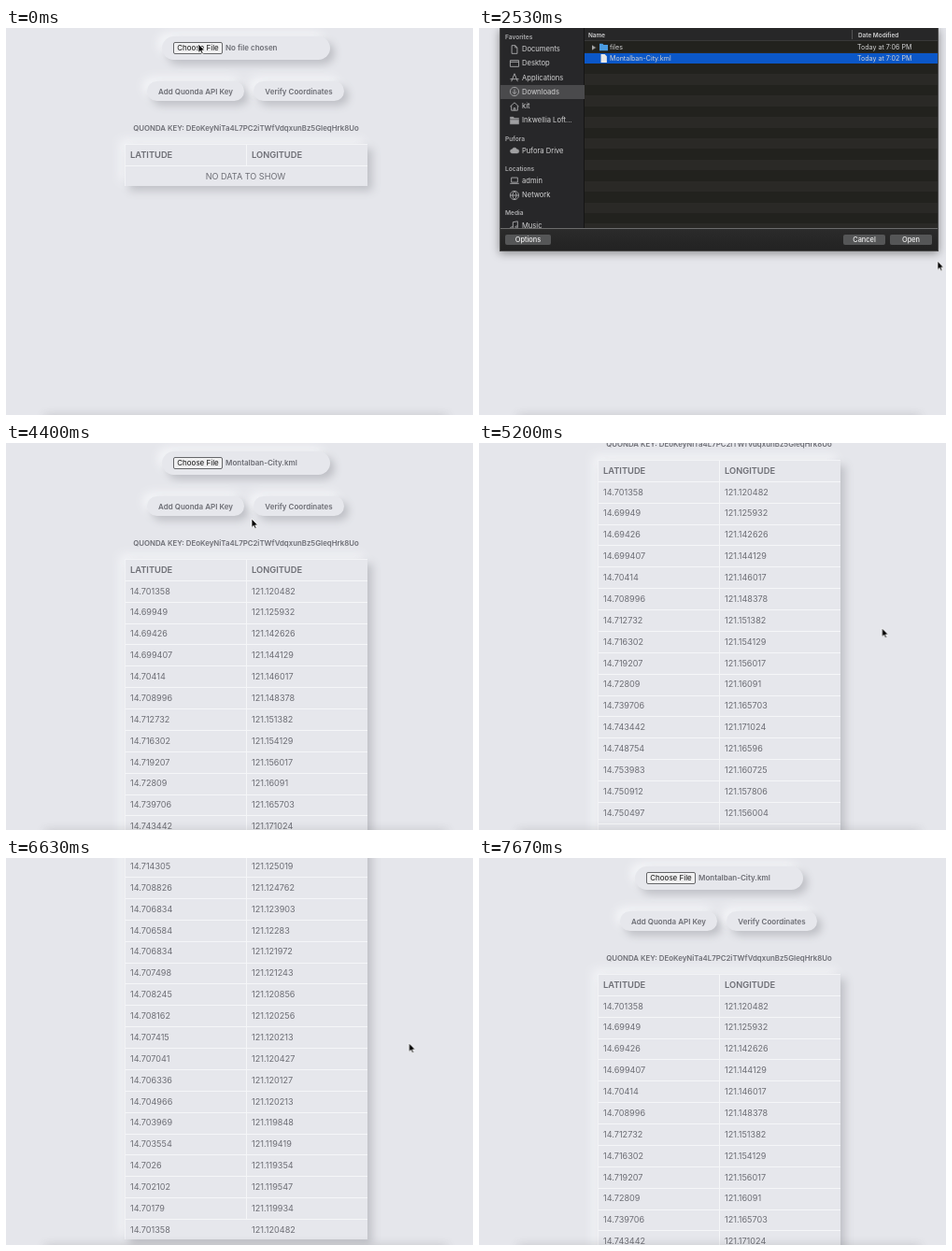
These frames come from a looping animation (500x414 px, 8110 ms). An HTML page:

```html
<!DOCTYPE html>
<html lang="en">
<head>
<meta charset="utf-8">
<title>Coordinate table</title>
<style>
  html, body { margin: 0; width: 100%; height: 100%; overflow: hidden; background: #e5e6eb; }
  #stage { position: absolute; left: 0; top: 0; width: 500px; height: 414px; overflow: hidden;
    background: #e5e6eb; font-family: Inter, "Liberation Sans", sans-serif; color: #6d6e75; }
  #stage div, #stage svg { position: absolute; box-sizing: border-box; }
  .text { white-space: pre; height: 20px; line-height: 20px; }
  .mid { transform: translateX(-50%); }
  .soft { background: #e6e7ec; box-shadow: 5px 5px 9px #bfc0c6, -5px -5px 10px #f3f4f7; }
  .pill { border-radius: 13px; }
  .bold { font-weight: 600; font-size: 8px; }
  .head { font-weight: 600; font-size: 9.3px; }
  .cell { font-size: 9.1px; }
  .line { background: #f5f6f8; }
  .picker { background: #232323; border: 1px solid #484848; border-top: 0;
    box-shadow: 0 2px 9px rgba(0, 0, 0, .4); color: #d2d2d3; }
  .group { font-weight: 600; font-size: 6.6px; color: #adadaf; }
  .item { font-size: 7.6px; }
  .file { font-size: 7.1px; }
  .key { border-radius: 2px; background: #555657; font-size: 7.4px; font-weight: 500;
    line-height: 11px; text-align: center; color: #efefef; }
</style>
</head>
<body>
<div id="stage"></div>
<script>
const LOOP = 8110;
const stage = document.getElementById('stage');

function box(parent, x, y, w, h, cls = '', style = '') {
  const el = document.createElement('div');
  el.className = cls;
  el.style.cssText = `left:${x}px;top:${y}px;width:${w}px;height:${h}px;${style}`;
  parent.append(el);
  return el;
}

// y is the optical centre of the line
function text(parent, x, y, value, cls = '', style = '') {
  const el = document.createElement('div');
  el.className = 'text ' + cls;
  el.style.cssText = `left:${x}px;top:${y - 9.3}px;${style}`;
  el.textContent = value;
  parent.append(el);
  return el;
}

function icon(parent, x, y, size, path, attrs) {
  const holder = box(parent, x, y, size, size);
  holder.innerHTML = `<svg width="${size}" height="${size}" viewBox="0 0 12 12" ` +
    `style="overflow:visible"><path d="${path}" ${attrs}/></svg>`;
  return holder;
}

// steps: [time, value, easing towards the next step]
function play(el, prop, steps, ease = 'linear') {
  const all = [[0, steps[0][1], steps[0][0] ? 'steps(1,end)' : steps[0][2]],
    ...steps, [LOOP, steps[steps.length - 1][1]]];
  el.animate(all.map(([t, value, easing = ease]) =>
    ({ offset: t / LOOP, [prop]: value, easing })), { duration: LOOP, iterations: Infinity });
}

const during = (el, from, to) => play(el, 'opacity',
  [[0, from ? 0 : 1], ...(from ? [[from, 1]] : []), [to, 0]], 'steps(1,end)');

const SWAP = 3960, PICK = 1970;

// Web page
const page = box(stage, 0, 0, 500, 1210);
box(page, 167, 9, 180, 25, 'soft pill');
const choose = box(page, 179, 14.5, 53, 13, '',
  'border:1px solid #66676a;border-radius:2px;background:#f0f0f1');
text(page, 205.5, 20.7, 'Choose File', 'mid', 'font-size:8px;color:#111');
during(text(page, 235, 20.7, 'No file chosen', 'bold'), 0, SWAP);
during(text(page, 235, 20.7, 'Montalban-City.kml', 'bold'), SWAP, LOOP);
play(choose, 'backgroundColor',
  [[0, '#f0f0f1'], [430, '#d6d6d8'], [610, '#f0f0f1']], 'steps(1,end)');

box(page, 151, 57, 104, 21, 'soft pill');
box(page, 265, 57, 97, 21, 'soft pill');
text(page, 203, 67.3, 'Add Quonda API Key', 'bold mid');
text(page, 313.5, 67.3, 'Verify Coordinates', 'bold mid');
text(page, 257, 106.6, 'QUONDA KEY: DEoKeyNiTa4L7PC2iTWfVdqxunBz5GIeqHrk8Uo', 'bold mid',
  'font-size:7.85px');

// Fractions of 14 degrees north and 121 degrees east
const points = `701358 120482,69949 125932,69426 142626,699407 144129,70414 146017,
708996 148378,712732 151382,716302 154129,719207 156017,72809 16091,739706 165703,
743442 171024,748754 16596,753983 160725,750912 157806,750497 156004,746927 153386,
742361 149823,737546 145317,733312 14094,728995 136734,725093 1327,721776 129654,
721942 126993,720531 124933,719203 125019,717543 126049,715966 124332,714305 125019,
708826 124762,706834 123903,706584 12283,706834 121972,707498 121243,708245 120856,
708162 120256,707415 120213,707041 120427,706336 120127,704966 120213,703969 119848,
703554 119419,7026 119354,702102 119547,70179 119934,701358 120482`
  .split(',').map(p => p.trim().split(' '));
const ROW = 22.87, TOP = 123.6;

function table(rows) {
  const el = box(page, 127, TOP, 260, ROW * (rows + 1), 'soft',
    'border:solid #f2f3f6;border-width:1px 0 0 1px');
  box(el, 129, 0, 1, ROW * rows, 'line');
  text(el, 5, 10.4, 'LATITUDE', 'head');
  text(el, 135, 10.4, 'LONGITUDE', 'head');
  for (let i = 1; i <= rows; i++) box(el, 0, ROW * i - .6, 259, 1, 'line');
  return el;
}

const empty = table(1);
text(empty, 128.5, 33.3, 'NO DATA TO SHOW', 'cell mid');
during(empty, 0, SWAP);

const full = table(points.length);
points.forEach(([lat, lon], i) => {
  const y = 33.3 + ROW * i;
  text(full, 5, y, '14.' + lat, 'cell');
  text(full, 135, y, '121.' + lon, 'cell');
});
during(full, SWAP, LOOP);

const up = px => `translateY(${-px}px)`;
play(page, 'transform', [
  [0, up(0)], [4900, up(0), 'ease-in'], [5200, up(105), 'ease-out'], [5700, up(395)],
  [5730, up(395), 'cubic-bezier(.4,0,.7,.7)'], [6030, up(646), 'ease-out'], [6530, up(790)],
  [6720, up(790), 'ease-in-out'], [7430, up(4)], [7470, up(4), 'ease-out'], [7670, up(0)]
]);

box(stage, 42, 415, 430, 10, '', 'box-shadow:0 0 11px rgba(60,60,65,.22)');

// File picker
const picker = box(stage, 22, 0, 470, 239, 'picker');
const inner = box(picker, -23, 0, 500, 239);
box(inner, 23, 0, 90, 214, '', 'background:#272729;border-right:1px solid #151515');
box(inner, 23, 61, 90, 15, '', 'background:#4a4a4c');

const STROKE = 'fill="none" stroke="#a9a9ab" stroke-width="1.1"';
const SOLID = 'fill="#a0a0a2" stroke="#a0a0a2" stroke-width=".6"';
const sidebar = [
  [9, 'Favorites'],
  [22.3, 'Documents', 'M2.5 .8H7L9.5 3.5V11.2H2.5ZM7 .8V3.5H9.5'],
  [37.7, 'Desktop', 'M.5 2H11.5V10H.5ZM.5 4H11.5'],
  [53, 'Applications', 'M2 11L6 1 10 11M.5 8H11.5'],
  [68.2, 'Downloads', 'M6 .5A5.5 5.5 0 1 1 5.9 .5ZM6 3V9M3.5 6.5L6 9 8.5 6.5'],
  [83.4, 'kit', 'M.5 6L6 1 11.5 6M2 5V11H10V5M5 11V8H7V11'],
  [98.6, 'Inkwellia Loft...', 'M.5 1.5H4.5L6 3H11.5V4H.5ZM.5 5H11.5V10.5H.5Z', SOLID],
  [118, 'Pufora'],
  [131, 'Pufora Drive', 'M3 9.5A2.5 2.5 0 0 1 3 4.5 3.2 3.2 0 0 1 9 4.5 2.5 2.5 0 0 1 9.5 9.5Z', SOLID],
  [150, 'Locations'],
  [163, 'admin', 'M2 2.5H10V8.5H2ZM.3 10H11.7'],
  [178.4, 'Network', 'M6 .5A5.5 5.5 0 1 1 5.9 .5ZM.5 6H11.5M6 .5Q1 6 6 11.5Q11 6 6 .5'],
  [197.7, 'Media'],
  [210.8, 'Music', 'M4 9.5V2L10 1V8.5M4 9.5A1.5 1.2 0 1 1 3.9 9M10 8.5A1.5 1.2 0 1 1 9.9 8']
];
for (const [y, label, path, paint = STROKE] of sidebar) {
  text(inner, path ? 46 : 28, y, label, path ? 'item' : 'group');
  if (path) icon(inner, 33, y - 4.8, 10, path, paint);
}

const list = box(inner, 113, 0, 378, 214, '',
  'background:repeating-linear-gradient(#22221e 0 11.44px,#2a2926 11.44px 22.88px) 0 15px');
box(list, 0, 0, 378, 14, '', 'background:#272728;border-bottom:1px solid #383838');
box(list, 286, 2, 1, 10, '', 'background:#555');
text(list, 4, 6.8, 'Name', '', 'font-size:6.4px;font-weight:600');
text(list, 293, 6.8, 'Date Modified', '', 'font-size:6.4px;font-weight:600');
during(box(list, 0, 26.5, 378, 11.4, '', 'background:#0b57c8'), PICK, SWAP);
icon(list, 6.5, 17.5, 6, 'M1 0L10 6 1 12Z', 'fill="#a8a8a8"');

const files = box(list, 0, 0, 378, 214);
icon(files, 16, 16, 9, 'M0 1H4.5L6 2.5H12V11H0Z', 'fill="#4a9be0"');
icon(files, 15.5, 27.5, 9, 'M2 0H7.5L10.5 3V12H2Z', 'fill="#e8e8e8"');
text(files, 27, 20.6, 'files', 'file');
text(files, 27, 32, 'Montalban-City.kml', 'file');
text(files, 292, 20.6, 'Today at 7:06 PM', 'file');
text(files, 292, 32, 'Today at 7:02 PM', 'file');
play(files, 'opacity', [[0, .36], [1400, .36], [1560, 1]]);

const veil = box(inner, 23, 0, 468, 214, '',
  'background:linear-gradient(#48494a,#616264 14px,#6c6d6f 36px,#717275)');
play(veil, 'opacity', [[0, 0], [3560, 0], [3650, 1]]);

box(inner, 23, 214, 468, 24, '',
  'background:linear-gradient(#2b2b2b,#222);border-top:1px solid #6c6c6c');
const button = (x, w, label, style) => {
  const el = box(inner, x, 221, w, 11, 'key', style);
  el.textContent = label;
  return el;
};
button(28, 49, 'Options');
button(390, 45, 'Cancel');
button(440, 45, 'Open', 'background:#3a3a3b;color:#747475');
const open = button(440, 45, 'Open');
during(open, PICK, SWAP);
play(open, 'backgroundColor',
  [[0, '#555657'], [3530, '#707173'], [3620, '#555657']], 'steps(1,end)');

play(picker, 'transform', [
  [0, up(255)], [1029, up(255)], [1030, up(225), 'ease-out'], [1280, up(0)],
  [3690, up(0), 'ease-in'], [3900, up(255)]
]);

// Pointer
const pointer = icon(stage, 0, 0, 12,
  'M0 0V9.4L2.2 7.4 3.7 10.8 5.2 10.1 3.8 6.9H6.6Z',
  'fill="#000" stroke="#fff" stroke-width=".8"');
const at = (x, y) => `translate(${x}px,${y}px)`;
play(pointer, 'transform', [
  [0, at(206, 17)], [1100, at(206, 17)], [1330, at(234, 44)], [1800, at(186, 31)],
  [2050, at(186, 31)], [2480, at(493, 252)], [2670, at(479, 234)], [2700, at(479, 234)],
  [3100, at(461, 222)], [3700, at(461, 222)], [4130, at(263, 81)], [4400, at(263, 81)],
  [4730, at(431.5, 198)], [7100, at(431.5, 198)], [7430, at(417, 186)]
], 'ease-in-out');
during(pointer, 0, 7640);
</script>
</body>
</html>
```
